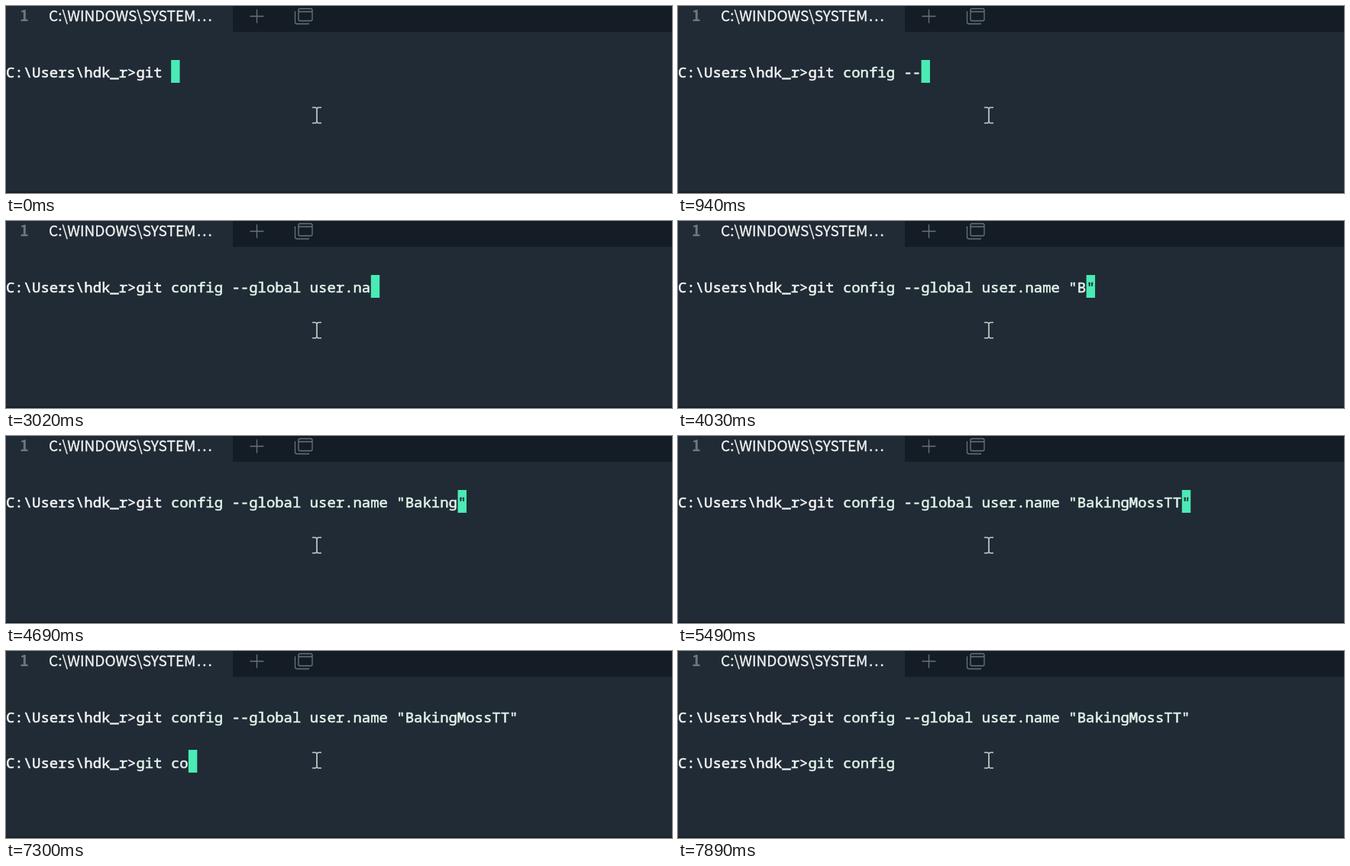
Recreate the animation shown at these times as an HTML page. Size 872 px wide and 246 px high, loop 8000 ms.

```html
<!DOCTYPE html>
<html lang="en">
<head>
<meta charset="utf-8">
<title>Terminal</title>
<style>
  html, body { margin: 0; width: 100%; height: 100%; overflow: hidden; background: #212b35; }
  svg { display: block; width: 872px; height: 246px; }
  text { white-space: pre; }
  .tab { font: 500 19.05px "Noto Sans CJK SC", "Noto Sans CJK JP", "Noto Sans", sans-serif; fill: #f4f5f5; stroke: #f4f5f5; stroke-width: .3; }
  .num { font-size: 20px; font-weight: 700; fill: #6d777e; stroke: none; }
  .dots { letter-spacing: 2px; }
  .mono { font: 500 18.96px "Noto Sans Mono", "DejaVu Sans Mono", monospace; font-variant-ligatures: none; fill: #f4f5f5; stroke: #f4f5f5; stroke-width: .55; }
  .typed { fill: #e2f4ea; stroke: #e2f4ea; }
  .under { fill: #212b35; stroke: #212b35; }
  .icon { fill: none; stroke: #69737b; stroke-width: 1.3; }
  .beam { fill: none; stroke: #c6cacd; stroke-width: 1.7; }
</style>
</head>
<body>
<svg viewBox="0 0 872 246">
  <rect width="872" height="246" fill="#212b35"/>
  <rect x="297" width="575" height="34" fill="#141d26"/>
  <rect y="244.5" width="872" height="1.5" fill="#141b22"/>

  <text class="tab num" x="18" y="20">1</text>
  <text class="tab" x="56" y="20">C:\WINDOWS\SYSTEM</text>
  <text class="tab dots" x="250" y="20">...</text>
  <path class="icon" d="M319.5 13.5h18M328.5 4.5v18"/>
  <path class="icon" d="M385 3.5h14a2 2 0 0 1 2 2v12a2 2 0 0 1-2 2h-14a2 2 0 0 1-2-2v-12a2 2 0 0 1 2-2zM383 7.5h18M378.5 7v14a2.5 2.5 0 0 0 2.5 2.5h16"/>

  <text class="mono" y="94"><tspan id="prompt1"></tspan><tspan id="line1" class="typed"></tspan></text>
  <text class="mono" y="153.5"><tspan id="prompt2"></tspan><tspan id="line2" class="typed"></tspan></text>
  <g id="cursor">
    <rect width="11.4" height="30" fill="#4aebb4"/>
    <text id="under" class="mono under" y="23"></text>
  </g>
  <path class="beam" d="M401 133.5h4.5l1.5 1.5l1.5-1.5h4.5M407 135v18M401 154h4.5l1.5-1.5l1.5 1.5h4.5"/>
</svg>
<script>
const LOOP = 8000, CELL = 11.376;
const PROMPT = "C:\\Users\\hdk_r>";
const $ = id => document.getElementById(id);

// head and tail are the text before and after the cursor on the active line
let state = { t: 0, done: null, prompt: PROMPT, head: "git ", tail: "", top: 71, on: true };
const states = [state];

function at(t, change) {
  state = { ...state, on: true, ...change, t };
  states.push(state);
}

function type(from, to, keys) {
  const gap = keys.length > 1 ? (to - from) / (keys.length - 1) : 0;
  keys.forEach((key, i) => at(Math.round(from + gap * i), { head: state.head + key }));
}

const blinkOff = t => at(t, { on: false });

type(200, 940, [..."config --"]);
type(1200, 1200, ["g"]);
type(1340, 1870, [..."lobal "]);
blinkOff(2140);
type(2410, 3210, ["u", "s", "e", "r", ".n", "a", "me", " "]);
type(3550, 3550, ['""']);
at(3830, { head: state.head.slice(0, -1), tail: '"' });
type(4030, 4030, ["B"]);
type(4160, 4830, [..."akingMo"]);
type(4960, 4960, ["ss"]);
blinkOff(5230);
type(5360, 5490, ["T", "T"]);
at(5690, { head: state.head + state.tail, tail: "" });
at(5760, { done: state.head, prompt: "", head: "", top: 100.5 });
at(5830, { prompt: PROMPT, top: 130 });
blinkOff(6160);
at(6420, {});
blinkOff(6690);
type(6750, 7630, ["g", "i", "t", " ", "c", "o", "n", "fi", "g", " "]);
blinkOff(7890);

function show(s) {
  const active = s.head + s.tail;
  const first = s.done ?? active;
  $("prompt1").textContent = PROMPT + first.slice(0, 4);
  $("line1").textContent = first.slice(4);
  $("prompt2").textContent = s.done === null ? "" : s.prompt;
  $("line2").textContent = s.done === null ? "" : active;
  const x = (s.prompt.length + s.head.length) * CELL;
  $("cursor").setAttribute("transform", `translate(${x} ${s.top})`);
  $("cursor").setAttribute("visibility", s.on ? "visible" : "hidden");
  $("under").textContent = s.tail;
}

const start = performance.now();
let shown;
function tick() {
  const t = (performance.now() - start) % LOOP;
  const next = states.findLast(s => s.t <= t);
  if (next !== shown) show(shown = next);
  requestAnimationFrame(tick);
}
tick();
</script>
</body>
</html>
```
